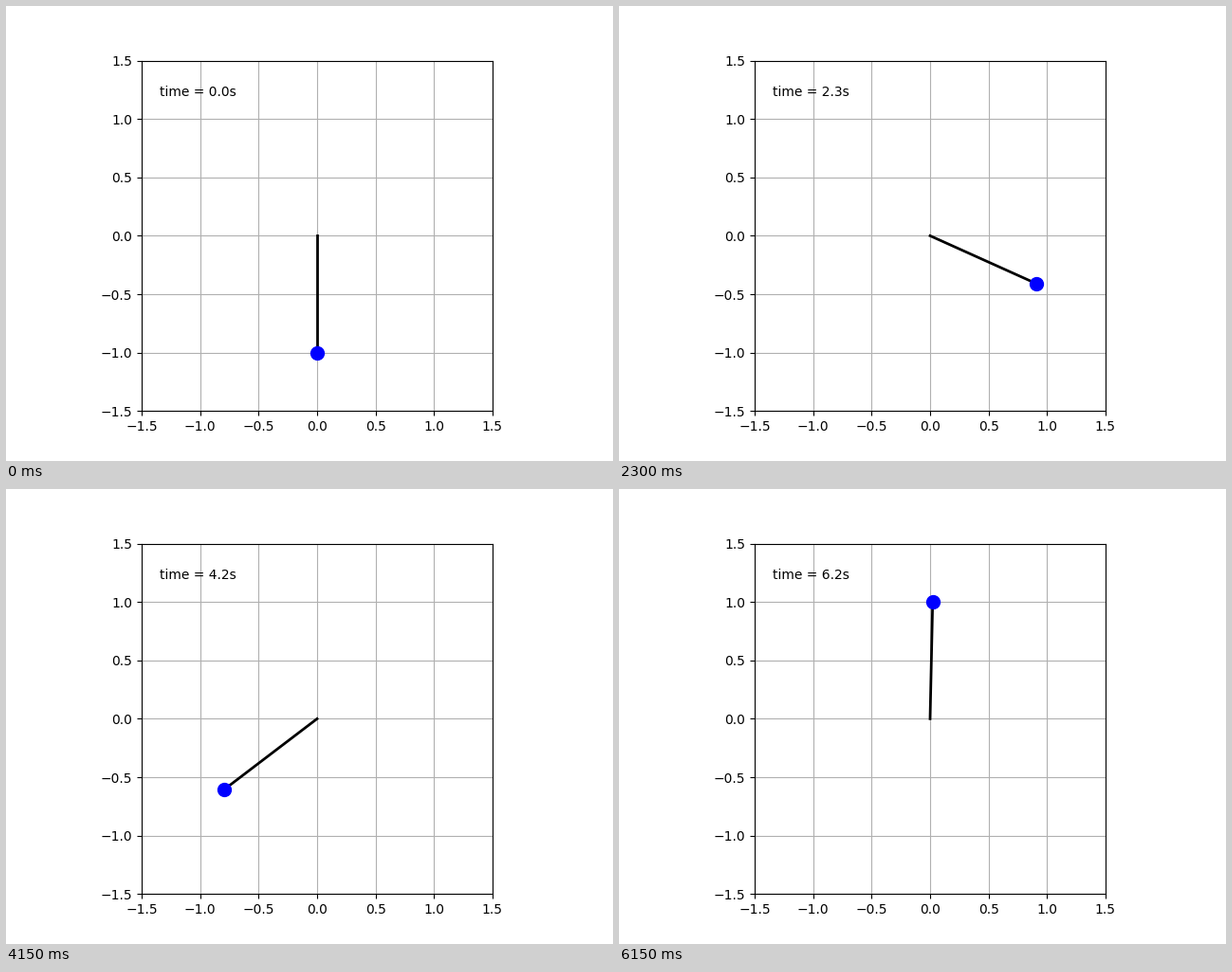
These frames come from a looping animation (640x480 px, 6250 ms). A matplotlib script:

```python
import numpy as np
import matplotlib.pyplot as plt
from matplotlib.animation import FuncAnimation

DT = 0.05
FRAMES = 125

# Key poses of the swing-up: time in s, angle from hanging in degrees
times = np.array([0, 1.0, 1.3, 1.95, 2.3, 2.6, 3.05, 3.62, 4.15, 4.55, 5.2])
poses = np.array([0, -27.7, -17.3, 53.5, 65.75, 32.9, -63.9, -121.3, -52.7,
                  63.2, 161])
# After the last key the pendulum settles exponentially near upright
REST, DECAY = 179.4, 3.5
gap = REST - poses[-1]


def spline_slopes(t, a, first, last):
    """Knot velocities of a smooth cubic spline with given end velocities."""
    h = np.diff(t)
    pull = 3 * np.diff(a) / h**2
    system = np.eye(len(t))
    rhs = np.zeros(len(t))
    rhs[0], rhs[-1] = first, last
    for k in range(1, len(t) - 1):
        left, right = 1 / h[k - 1], 1 / h[k]
        system[k, k - 1:k + 2] = left, 2 * (left + right), right
        rhs[k] = pull[k - 1] + pull[k]
    return np.linalg.solve(system, rhs)


slopes = spline_slopes(times, poses, 0, DECAY * gap)


def angle(t):
    """Pendulum angle in degrees at time t."""
    if t >= times[-1]:
        return REST - gap * np.exp(-DECAY * (t - times[-1]))
    k = np.searchsorted(times, t, side="right") - 1
    h = times[k + 1] - times[k]
    s = (t - times[k]) / h
    return (poses[k] + (poses[k + 1] - poses[k]) * s * s * (3 - 2 * s)
            + h * s * (1 - s) * (slopes[k] * (1 - s) - slopes[k + 1] * s))


fig, ax = plt.subplots(figsize=(6.4, 4.8), dpi=100)
ax.set_aspect("equal")
ax.set_xlim(-1.5, 1.5)
ax.set_ylim(-1.5, 1.5)
ax.grid()

rod, = ax.plot([], [], "k-", lw=2)
bob, = ax.plot([], [], "bo", markersize=10)
label = ax.text(0.05, 0.9, "", transform=ax.transAxes)


def update(i):
    t = i * DT
    theta = np.radians(angle(min(t, (FRAMES - 2) * DT)))  # hold the last pose
    x, y = np.sin(theta), -np.cos(theta)
    rod.set_data([0, x], [0, y])
    bob.set_data([x], [y])
    label.set_text(f"time = {t:.1f}s")
    return rod, bob, label


anim = FuncAnimation(fig, update, frames=FRAMES, interval=DT * 1000,
                     repeat=True, repeat_delay=0)
plt.show()
```
